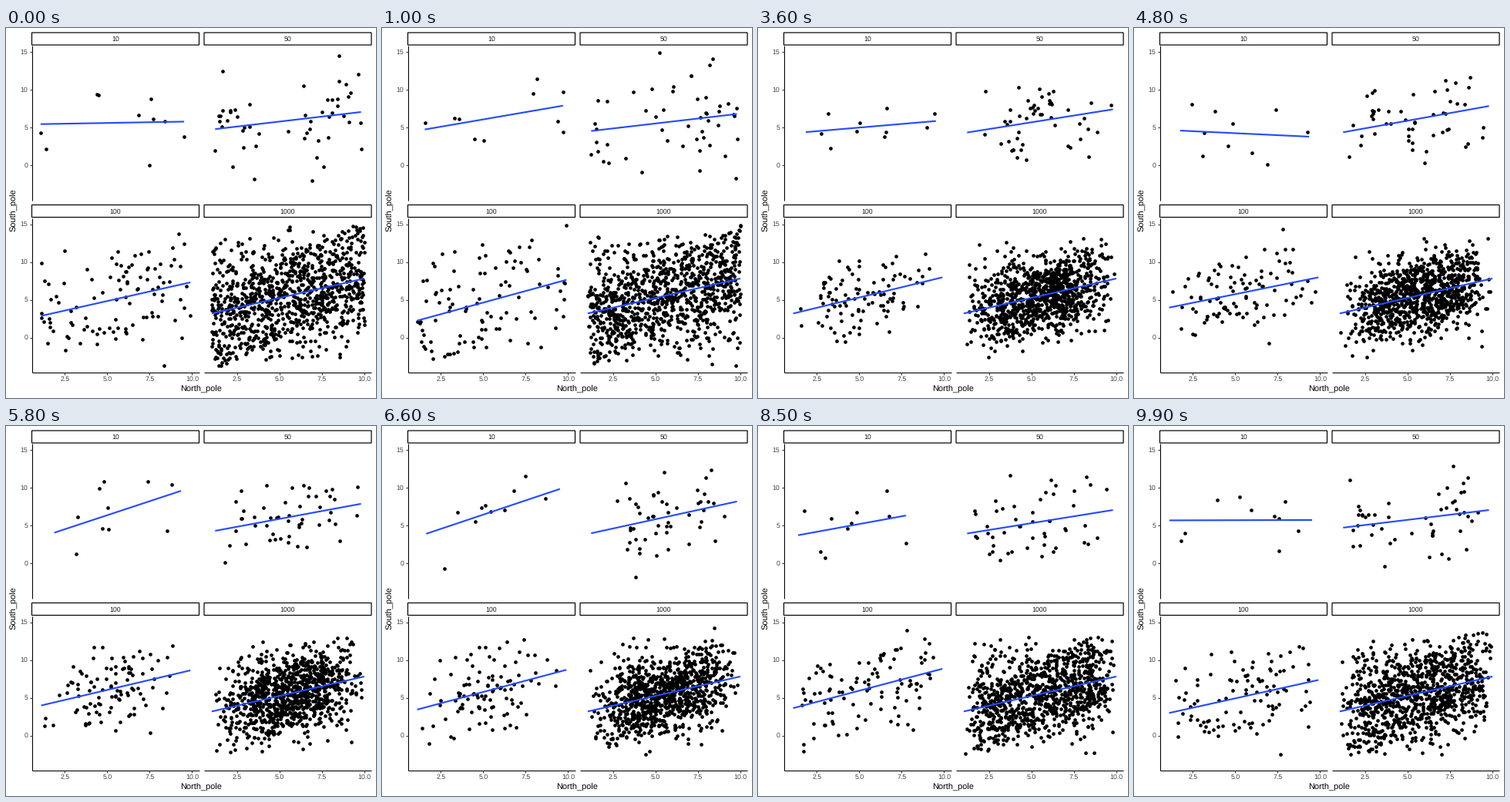
Recreate the animation shown at these times as a matplotlib script. Size 480 by 480 pixels, loop 10000 ms.

```python
import numpy as np
import matplotlib
import matplotlib.pyplot as plt
from matplotlib.animation import FuncAnimation
from matplotlib.patches import Rectangle

matplotlib.rcParams["font.family"] = "Liberation Sans"
matplotlib.rcParams["text.hinting"] = "none"

SIZE = 480
STATES, STEPS = 10, 10
SHIFT = 223.5                    # distance between neighbouring panels
LEFT, RIGHT, TOP, BOTTOM = 33.5, 250.5, 23, 223.5
BLUE = "#244BFF"
rng = np.random.default_rng(42)


def x_pix(v):
    return 21.4 + 22 * v


def y_pix(v):
    return 178.2 - 9.8 * v


def trend(x0, y0, x1, y1):
    """Ends of the fitted line, one row per state; constants are repeated."""
    return np.column_stack([np.broadcast_to(v, STATES)
                            for v in (x0, y0, x1, y1)])


# Sample size -> fitted line through the ten states, in data units
TRENDS = {
    10: trend([1.07, 1.55, 2.05, 1.9, 1.75, 1.75, 1.95, 1.0, 1.4, 1.35],
              [5.46, 4.75, 4.0, 4.3, 4.6, 4.6, 3.8, 4.15, 3.1, 6.85],
              [9.53, 9.7, 9.9, 9.6, 9.35, 9.35, 9.35, 9.85, 7.4, 9.53],
              [5.79, 7.9, 10.6, 6.9, 3.8, 3.8, 12.5, 4.55, 6.5, 5.5]),
    50: trend(1.2,
              [4.8, 4.55, 4.27, 4.33, 4.38, 4.38, 4.27, 3.41, 3.87, 4.37],
              9.8,
              [7.06, 6.8, 6.48, 7.2, 7.85, 7.85, 7.9, 8.78, 7.06, 7.06]),
    100: trend(1.1,
               [2.88, 2.25, 1.36, 2.8, 3.98, 3.98, 4.0, 2.35, 3.65, 3.6],
               9.9,
               [7.32, 7.65, 7.98, 7.98, 7.98, 7.98, 8.97, 8.2, 9.1, 7.6]),
    1000: trend(1.0, 3.2, 10.0, 7.83),
}


def cloud(n, line):
    """Half of the samples follow x, half are unrelated; fitted to the line."""
    x0, y0, x1, y1 = line
    x = rng.uniform(1, 10, n)
    y = np.where(rng.random(n) < 0.5, x, rng.uniform(1, 10, n))
    y += rng.uniform(-5, 5, n)
    rest = y - np.polyval(np.polyfit(x, y, 1), x)
    u = (x - x.min()) / np.ptp(x)
    y = np.clip(y0 + u * (y1 - y0) + rest, -3.7, 14.9)
    return np.column_stack([x0 + u * (x1 - x0), y])


fig = plt.figure(figsize=(SIZE / 72, SIZE / 72), dpi=72, facecolor="white")
ax = fig.add_axes([0, 0, 1, 1])
ax.set_xlim(0, SIZE)
ax.set_ylim(SIZE, 0)
ax.axis("off")


def stroke(x, y, color="black"):
    ax.plot(x, y, color=color, lw=1.07, solid_capstyle="butt")


def label(x, y, text, size=8.8, color="#444444", ha="center", va="center", **kw):
    ax.text(x, y, text, size=size, color=color, ha=ha, va=va, **kw)


def draw_frame(n, dx, dy):
    ax.add_patch(Rectangle((LEFT + dx, 6 + dy), RIGHT - LEFT, 16,
                           fc="white", ec="black", lw=1.2, snap=False))
    label((LEFT + RIGHT) / 2 + dx, 14.6 + dy, str(n), color="#1A1A1A")
    if dx == 0:
        stroke([LEFT] * 2, [TOP + dy, BOTTOM + dy])
        for v in (0, 5, 10, 15):
            y = y_pix(v) + dy
            stroke([LEFT - 2.75, LEFT], [y, y], "#333333")
            label(28.3, y, str(v), ha="right")
    if dy > 0:
        stroke([LEFT + dx, RIGHT + dx], [BOTTOM + dy] * 2)
        for v in (2.5, 5.0, 7.5, 10.0):
            x = x_pix(v) + dx
            stroke([x, x], [BOTTOM + dy, BOTTOM + dy + 2.75], "#333333")
            label(x, 455.8, f"{v:.1f}")


panels = []
for i, (n, lines) in enumerate(TRENDS.items()):
    dx, dy = i % 2 * SHIFT, i // 2 * SHIFT
    draw_frame(n, dx, dy)
    points = [cloud(n, line) for line in lines]
    dots = ax.scatter([], [], s=4.7 ** 2, c="black", linewidths=0, zorder=3)
    fit, = ax.plot([], [], color=BLUE, lw=2.13, solid_capstyle="butt", zorder=4)
    panels.append((points, lines, dots, fit, dx, dy))

label(253.5, 472, "North_pole", 11, "black", va="baseline")
label(10.3, 235.8, "South_pole", 11, "black", rotation=90)


def update(i):
    # each state rests, then glides linearly to the next one
    k, j = divmod(i, STEPS)
    hold = 3 if k == 0 else 4
    t = max(0, j - hold) / (STEPS - hold)
    nxt = (k + 1) % STATES
    for points, lines, dots, fit, dx, dy in panels:
        x, y = ((1 - t) * points[k] + t * points[nxt]).T
        dots.set_offsets(np.column_stack([x_pix(x) + dx, y_pix(y) + dy]))
        x0, y0, x1, y1 = (1 - t) * lines[k] + t * lines[nxt]
        fit.set_data([x_pix(x0) + dx, x_pix(x1) + dx],
                     [y_pix(y0) + dy, y_pix(y1) + dy])
    return []


anim = FuncAnimation(fig, update, frames=STATES * STEPS, interval=100,
                     repeat=True, repeat_delay=0)
plt.show()
```
